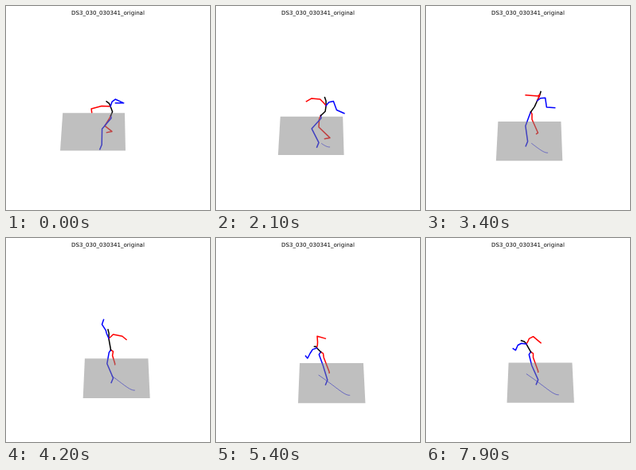
Animation, 256 px wide and 256 px high, one loop 8 s. Source, as an HTML page with a canvas:

```html
<!DOCTYPE html>
<html lang="en">
<head>
<meta charset="utf-8">
<title>Skeleton motion</title>
<style>
html, body { margin: 0; width: 100%; height: 100%; overflow: hidden; background: #fff; }
canvas, svg { position: absolute; left: 0; top: 0; width: 256px; height: 256px; }
text { font: 7.07px "DejaVu Sans", sans-serif; text-anchor: middle; fill: #000; }
</style>
</head>
<body>
<canvas id="stage"></canvas>
<svg viewBox="0 0 256 256"><text x="128" y="10.6">DS3_030_030341_original</text></svg>
<script>
const LOOP = 8, STEP = 0.1;
const RED = '#f00', BLUE = '#00f', BLACK = '#000';
const canvas = document.getElementById('stage');
const ctx = canvas.getContext('2d');
const scale = window.devicePixelRatio || 1;
canvas.width = canvas.height = 256 * scale;

// Key poses in seconds; bone directions in degrees, clockwise from the right
const times = [0, 1.3, 2.1, 3.4, 4.2, 5.4, 7.9];
const pose = {
  spine: [-92, -71, -62, -60, -100, -135, -119],
  neck: [-129, -97, -99, -69, -95, -150, -146],
  rThigh: [122, 107, 93, 90, 100, 82, 90],
  rShin: [38, 38, 44, 66, 73, 69, 70],
  lThigh: [130, 123, 132, 110, 100, 70, 76],
  lShin: [91, 75, 63, 82, 67, 73, 66],
  rCollar: [-177, -155, -133, -68, -42, -82, -63],
  rUpper: [-195, -186, -175, -219, -349, -454, -388],
  rFore: [83, 76, 149, 185, 40, 16, 40],
  lCollar: [-56, -39, -31, -20, -110, -219, -188],
  lUpper: [24, 50, 70, 82, -123, -243, -246],
  lFore: [180, 68, 24, 4, -71, -130, -146]
};
// Bones whose apparent length changes with the view
const reach = {
  spine: [11.5, 13.8, 14.1, 16.1, 14.7, 7.1, 11.4],
  rShin: [11.4, 17, 19.4, 18.6, 10.5, 19.3, 18],
  rUpper: [13.5, 12, 11, 3, 11.7, 7.5, 5.9]
};

const mix = (a, b, u) => a + (b - a) * u;
const bump = (t, mid, width) => Math.exp(-(((t - mid) / width) ** 2));
function ease(t, from, to) {
  const u = Math.min(1, Math.max(0, (t - from) / (to - from)));
  return u * u * (3 - 2 * u);
}

// Cubic interpolation that never overshoots its keys
function sample(keys, t) {
  const last = times.length - 1;
  let i = 0;
  while (i < last - 1 && t >= times[i + 1]) i++;
  const slope = k => (keys[k + 1] - keys[k]) / (times[k + 1] - times[k]);
  const tangent = k => {
    if (k === 0 || k === last) return 0;
    const a = slope(k - 1), b = slope(k);
    return a * b > 0 ? 2 * a * b / (a + b) : 0;
  };
  const span = times[i + 1] - times[i];
  const u = Math.min(1, (t - times[i]) / span), v = 1 - u;
  return mix(keys[i], keys[i + 1], u * u * (3 - 2 * u))
    + span * u * v * (tangent(i) * v - tangent(i + 1) * u);
}

const shift = ([x, y], dx, dy) => [x + dx, y + dy];
const between = (a, b, dx, dy) => [(a[0] + b[0]) / 2 + dx, (a[1] + b[1]) / 2 + dy];

function trace(points) {
  ctx.beginPath();
  points.forEach(([x, y]) => ctx.lineTo(x, y));
}

function line(points, color, width = 1.5) {
  trace(points);
  ctx.strokeStyle = color;
  ctx.lineWidth = width;
  ctx.stroke();
}

function drawBody(t) {
  const turn = ease(t, 2, 4.2), land = ease(t, 3.4, 4.8);
  const size = name => sample(reach[name], t);
  const bone = ([x, y], name, length) => {
    const a = sample(pose[name], t) * Math.PI / 180;
    return [x + length * Math.cos(a), y + length * Math.sin(a)];
  };

  const pelvis = [131.5, 137.5 + 5.5 * land - 4.5 * bump(t, 3.4, 0.5)];
  const chest = bone(pelvis, 'spine', size('spine'));
  const head = bone(chest, 'neck', size('spine') - 3.6);
  const bend = 1 - turn;

  const rHip = shift(pelvis, mix(-2, 3, turn), mix(4, 1.8, turn));
  const rKnee = bone(rHip, 'rThigh', mix(10.5, 5.2, turn));
  const rAnkle = bone(rKnee, 'rShin', size('rShin'));
  line([pelvis, rHip, rKnee, rAnkle, shift(rAnkle, -6.5 * bend, 1.3)], RED);

  const lHip = shift(pelvis, mix(0.5, -2.2, turn), 3.2);
  const lKnee = bone(lHip, 'lThigh', mix(17.8, 14.2, turn));
  const lAnkle = bone(lKnee, 'lShin', 19.6);
  line([pelvis, lHip, lKnee, lAnkle, shift(lAnkle, -2.4, 5.8)], BLUE);

  const waist = between(pelvis, chest, 2.3 * bend, bend);
  line([pelvis, waist, chest, between(chest, head, 0.7, -0.8), head], BLACK);

  const rShoulder = bone(chest, 'rCollar', mix(11, 7.4, turn));
  const rElbow = bone(rShoulder, 'rUpper', size('rUpper'));
  const rWrist = bone(rElbow, 'rFore', 18.3 - size('rUpper'));
  line([chest, between(chest, rShoulder, 0.3, 0), rShoulder, rElbow, rWrist], RED);

  const lLength = mix(11.7, 7, land);
  const lShoulder = bone(chest, 'lCollar', 10.8);
  const lElbow = bone(lShoulder, 'lUpper', lLength);
  const lWrist = bone(lElbow, 'lFore', 1.4 * lLength - 6);
  line([chest, between(chest, lShoulder, -1, -1.5), lShoulder, lElbow, lWrist], BLUE);
}

function draw(t) {
  ctx.setTransform(scale, 0, 0, scale, 0, 0);
  ctx.clearRect(0, 0, 256, 256);
  ctx.lineJoin = 'round';
  ctx.lineCap = 'square';

  // The ground speeds up to the right, then settles back a little
  const run = Math.min(t, 4.8);
  const settle = 1 - Math.exp((run - t) / 0.73);
  const d = 4 * run + 0.16 * run ** 3 - 3.4 * settle;
  const left = 68 + d, right = left + 82 + 0.07 * d;
  const bottom = 181.5 + 0.35 * d ** 1.2 + 1.6 * settle;
  const top = bottom - 47.3 - 0.09 * d;

  // The trail follows the walked distance
  const trail = [];
  const length = d + 6.5 * settle;
  for (let i = 0; i <= 20; i++) {
    const x = length * i / 20;
    trail.push([left + 64.7 - x, bottom - 10 - 0.66 * x + 0.7 * x * Math.exp(-x / 9)]);
  }
  if (length > 0.5) line(trail, BLUE, 0.7);

  drawBody(t);

  // The translucent ground lies over the legs
  const skew = d / 30;
  trace([[left + 3.2 - skew, top], [right - 1 - 1.3 * skew, top], [right, bottom], [left, bottom]]);
  ctx.fillStyle = 'rgba(128,128,128,0.5)';
  ctx.fill();
}

const start = performance.now();
function tick() {
  const t = (performance.now() - start) / 1000 % LOOP;
  draw(Math.floor(t / STEP + 1e-6) * STEP);
  requestAnimationFrame(tick);
}
tick();
</script>
</body>
</html>
```
